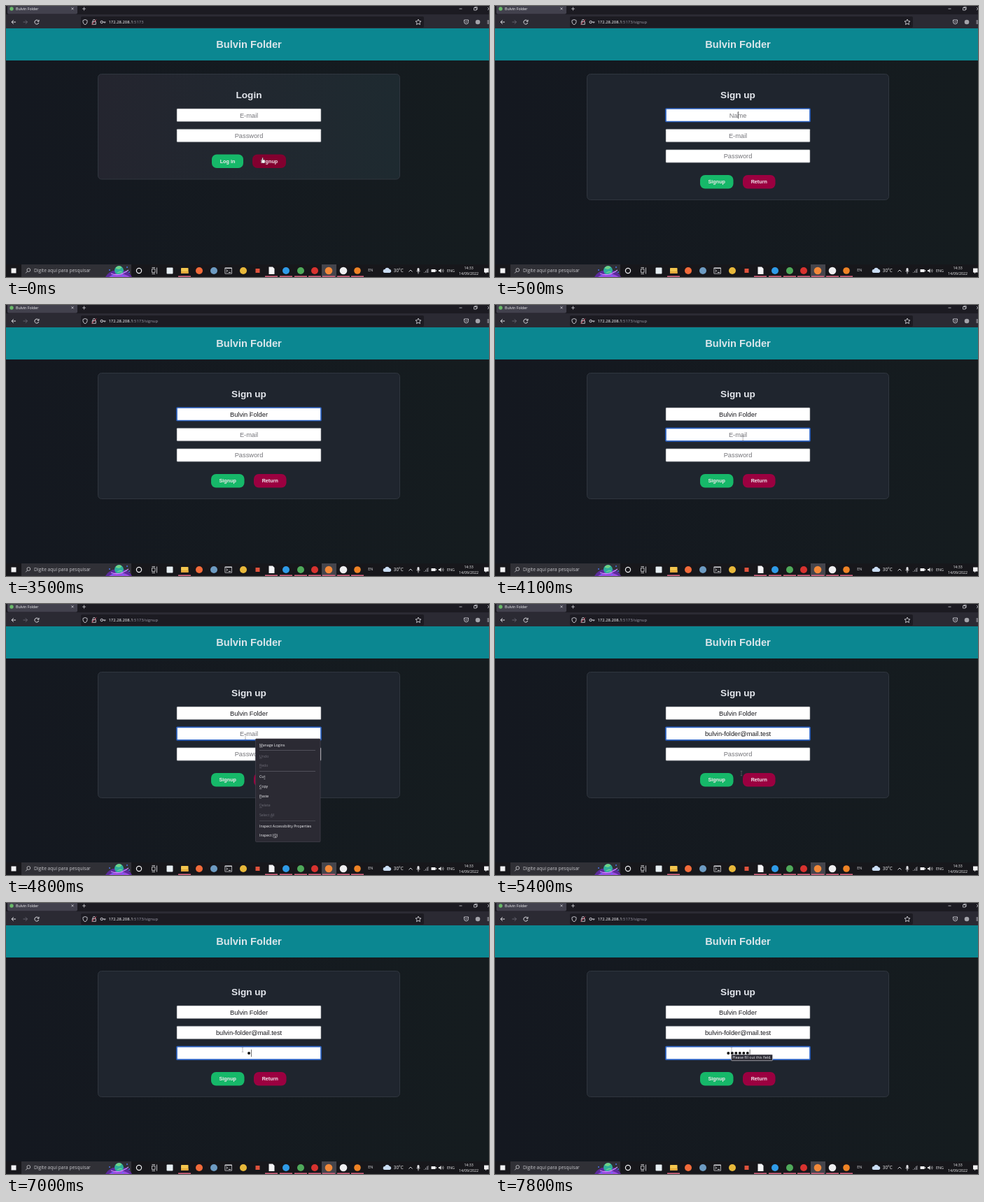
An HTML page with a canvas for the animation above (8 s loop, 690x388 px).

```html
<!DOCTYPE html>
<html lang="en">
<head>
<meta charset="utf-8">
<title>Bulvin Folder</title>
<style>
html, body { margin: 0; width: 100%; height: 100%; overflow: hidden; background: #151a1f; }
canvas { display: block; width: 690px; height: 388px; }
</style>
</head>
<body>
<canvas id="stage" width="690" height="388"></canvas>
<script>
const ctx = document.getElementById('stage').getContext('2d');
const LOOP = 8000, MID = 347;
const UI = '"Open Sans", "Noto Sans", sans-serif';
const PAGE = '"Liberation Sans", Arial, sans-serif';
const MONO = '"Liberation Mono", monospace';
const NAME = 'Bulvin Folder', EMAIL = 'bulvin-folder@mail.test';
const NAME_KEYS = [1000, 1100, 1500, 1600, 1800, 1900, 2200, 2400, 2500, 2700, 2800, 3000, 3200];
const PASS_KEYS = [6900, 7100, 7300, 7500, 7700, 7800];
const AT = { signup: 200, nameFocus: 500, emailFocus: 3800, menu: 4300, paste: 5100, passFocus: 5800, tip: 7300 };
// time, x, y
const MOUSE = [[0, 367, 221], [200, 367, 221], [500, 347, 156], [2400, 347, 156], [3500, 349, 156],
  [3700, 347, 186], [4200, 356, 192], [4500, 356, 192], [4700, 342, 190], [4800, 342, 190],
  [5000, 366, 275], [5200, 366, 275], [5600, 338, 210], [8000, 338, 210]];

function rect(x, y, w, h, fill, radius = 0, stroke, width = 1) {
  ctx.beginPath();
  ctx.roundRect(x, y, w, h, radius);
  if (fill) { ctx.fillStyle = fill; ctx.fill(); }
  if (stroke) { ctx.strokeStyle = stroke; ctx.lineWidth = width; ctx.stroke(); }
}
function circle(x, y, r, fill, stroke, width = 1) {
  rect(x - r, y - r, 2 * r, 2 * r, fill, r, stroke, width);
}
function path(d, color, width = 0.9, fill) {
  const p = new Path2D(d);
  if (fill) { ctx.fillStyle = fill; ctx.fill(p); }
  if (color) { ctx.strokeStyle = color; ctx.lineWidth = width; ctx.stroke(p); }
}
function text(s, x, y, size, color, { align = 'left', font = UI, style = '' } = {}) {
  ctx.font = `${style} ${size}px ${font}`;
  ctx.textAlign = align;
  ctx.fillStyle = color;
  ctx.fillText(s, x, y + size * 0.36);
  return ctx.measureText(s).width;
}
const centered = (s, x, y, size, color, style = '', font = PAGE) =>
  text(s, x, y, size, color, { align: 'center', font, style });
function gradient(x0, x1, from, to) {
  const g = ctx.createLinearGradient(x0, 0, x1, 0);
  g.addColorStop(0, from);
  g.addColorStop(1, to);
  return g;
}

function drawBrowser(t) {
  rect(0, 0, 690, 12, '#1c1b22');
  rect(2, -3, 100, 14.5, '#42414d', 2);
  circle(8, 4, 2.7, '#69b96a');
  text(NAME, 14, 4, 5.3, '#f2f2f5');
  path('M93.5 2.3l3 3m0-3l-3 3M109 4h5m-2.5-2.5v5M647.5 4h4', '#e4e4ea', 0.7);
  path('M668.5 2.5h3.5v3.5h-3.5zM669.7 2.5v-1h3.5v3.5h-1.2M688 2l4 4m0-4l-4 4', '#e4e4ea', 0.7);

  rect(0, 12, 690, 20, '#2b2a33');
  path('M14 23H8m2.7-2.7L8 23l2.7 2.7', '#f0f0f4');
  path('M24.500 23h6m-2.700-2.700l2.700 2.700l-2.700 2.700', '#6a6974');
  path('M46.500 21.500a3 3 0 1 0 .3 2.500M47 19.800v2.400h-2.400', '#f0f0f4');
  rect(107, 15, 490, 16, '#1c1b22', 2);
  path('M113 19.500l3 1v2.500q0 2.500-3 3.800q-3-1.300-3-3.800v-2.500z', '#e4e4ea', 0.8);
  path('M123.300 22.500h5v3.800h-5zM124.200 22.500v-1.500a1.600 1.600 0 0 1 3.200 0v1.500', '#e4e4ea', 0.8);
  path('M122.500 26.500l6.500-7', '#e2405c', 0.9);
  circle(136.700, 23, 1.700, null, '#e4e4ea', 0.9);
  path('M138.500 23h4m-1.500 0v1.600', '#e4e4ea', 0.9);
  const host = text('172.28.208.1', 146.5, 23, 5.9, '#fbfbfe');
  text(t < AT.signup ? ':5173' : ':5173/signup', 146.5 + host, 23, 5.9, '#9a99a6');
  path('M589 19l1.200 2.600l2.800.3l-2.100 1.900l.6 2.800l-2.500-1.400l-2.500 1.400l.6-2.800l-2.100-1.900l2.800-.3z', '#e4e4ea', 0.8);
  path('M654.500 20h6v2.500q0 3.300-3 3.300q-3 0-3-3.300zM656 22l1.500 1.500l1.500-1.500', '#e4e4ea', 0.8);
  circle(674, 23, 3.3, '#a3a3aa');
  path('M687.500 21h4m-4 2h4m-4 2h4', '#e4e4ea', 0.8);
}

function button(label, x, y, w, color) {
  rect(x, y, w, 19.5, color, 7);
  centered(label, x + w / 2, y + 9.8, 7.2, '#f3e9ee', 'bold');
}

function input(y, value, placeholder, focused, caret) {
  rect(244, y, 206, 18.5, '#fff', 1, focused ? '#2c63c4' : '#70757b', focused ? 1.7 : 0.6);
  const isDots = placeholder === 'Password' && value;
  let width = 0;
  if (isDots) {
    width = value.length * 5.5;
    [...value].forEach((_, i) => circle(MID - width / 2 + 2.8 + i * 5.5, y + 9.4, 2, '#111'));
  } else {
    width = centered(value || placeholder, MID, y + 9.2, 9.25, value ? '#15151a' : '#75757a');
  }
  if (focused && caret) rect(MID + (value ? width / 2 + 0.3 : 0), y + 4, 0.6, 10.5, '#111');
}

function drawPage(t) {
  rect(0, 32, 690, 338, gradient(0, 690, '#141820', '#151c1f'));
  rect(0, 32, 690, 46, '#0b8791');
  centered(NAME, MID, 54.5, 14.65, '#d9e5ea', 'bold');

  if (t < AT.signup) {
    rect(131.5, 97.5, 431, 150.5, gradient(131, 563, '#24252f', '#1e2a30'), 5, '#30363f');
    centered('Login', MID, 127, 13.6, '#e4e7ed', 'bold');
    input(147, '', 'E-mail');
    input(176.3, '', 'Password');
    button('Log in', 294, 212.5, 45, '#16b869');
    button('Signup', 352, 212.5, 48, '#82002f');
    return;
  }

  const nameCount = NAME_KEYS.filter(k => k <= t).length;
  const passCount = PASS_KEYS.filter(k => k <= t).length;
  const events = [AT.nameFocus, ...NAME_KEYS, AT.emailFocus, AT.paste, AT.passFocus, ...PASS_KEYS];
  const idle = t - Math.max(...events.filter(e => e <= t));
  const caret = idle < 200 || idle % 1000 >= 700;
  const email = t >= AT.paste ? EMAIL : '';

  rect(131.5, 97.5, 431, 180, '#1f252e', 5, '#30363f');
  centered('Sign up', MID, 127, 13.6, '#e4e7ed', 'bold');
  input(147, NAME.slice(0, nameCount), 'Name', t >= AT.nameFocus && t < AT.emailFocus, caret);
  input(176.3, email, 'E-mail', t >= AT.emailFocus && t < AT.passFocus, caret);
  input(205.7, '*'.repeat(passCount), 'Password', t >= AT.passFocus, caret);
  button('Signup', 293, 242, 47.5, '#16b869');
  button('Return', 354, 242, 46.5, '#9b0040');
}

function drawMenu(hoverPaste) {
  rect(356.5, 193, 92.5, 147.5, '#2b2a33', 1, '#45444f', 0.7);
  if (hoverPaste) rect(358, 268.5, 89, 13, '#494853');
  // label, y, index of the underlined letter, disabled
  const items = [['Manage Logins', 202, 0], ['Undo', 218, 0, 1], ['Redo', 231.5, 0, 1], ['Cut', 247.5, 2],
    ['Copy', 261.5, 0], ['Paste', 275, 0], ['Delete', 288.5, 0, 1], ['Select All', 302, 7, 1],
    ['Inspect Accessibility Properties', 318, -1], ['Inspect (Q)', 331.5, 9]];
  for (const [label, y, key, disabled] of items) {
    const color = disabled ? '#6d6c77' : '#f5f5f8';
    text(label, 362, y, 5.2, color);
    if (key < 0) continue;
    const x = 362 + ctx.measureText(label.slice(0, key)).width;
    rect(x, y + 2.7, ctx.measureText(label[key]).width, 0.5, color);
  }
  for (const y of [209.3, 239.3, 310]) rect(362, y, 80, 0.6, '#5d5c67');
}

function drawSuggestion() {
  rect(243.5, 224.5, 206, 42.5, '#2b2a33', 0, '#4a4953', 0.6);
  rect(243.5, 252, 206, 15, '#5b5a65');
  circle(249.8, 230.3, 2.9, null, '#a5a4ae', 0.6);
  path('M247 230.300h5.600M249.800 227.400q-2.600 2.900 0 5.800q2.600-2.900 0-5.800', '#a5a4ae', 0.5);
  text('Use a Securely Generated Password', 255, 230.2, 5.07, '#fbfbfe');
  text('Kdr7TMzbqEy4n6P', 255, 239, 4.9, '#b5b4be', { font: MONO });
  text('Vulpane will save this password for this website.', 255, 246.8, 4.2, '#a9a8b3', { style: 'italic' });
  centered('View Saved Logins', 346.5, 259.6, 5.1, '#fbfbfe', '', UI);
}

function drawTooltip() {
  rect(337.5, 217, 59, 8.7, '#2b2a33', 1, '#c9c9cf', 0.7);
  centered('Please fill out this field.', 367, 221.4, 5.2, '#fbfbfe', '', UI);
}

function drawTaskbar() {
  rect(0, 370, 690, 18, '#17171b');
  rect(7.5, 375.5, 7, 7, '#f2f2f4');
  rect(22, 370, 157, 18, '#303036');
  circle(32.3, 378, 2.4, null, '#d5d5d9', 0.8);
  path('M30.600 379.800l-2.400 2.600', '#d5d5d9', 0.8);
  text('Digite aqui para pesquisar', 40, 379, 6.63, '#c6c6cb');

  // saucer and planet in the search box
  path('M142 388q7-12 20-9q12-3 18 9z', null, 0, '#5b2a9c');
  path('M147 388q14-10 30 0z', null, 0, '#9a4be0');
  circle(161.500, 378.500, 6.500, '#2fae9b');
  path('M157 375q4-4 8-1q-3 4-8 1M159 382q4-3 7-1', '#7fe08f', 0.8, '#6fcf7f');
  path('M150 383q12 5 25-5', '#d08bff', 1.1);
  for (const [x, y] of [[148, 378], [173, 374], [176, 381], [152, 386], [167, 386]]) circle(x, y, 0.9, '#4f7dff');

  circle(190, 379, 3.6, null, '#f2f2f4', 1.2);
  path('M208.500 376.500h4.500v5h-4.500zM208.500 374.500h4.500M208.500 383.500h4.500M215.500 374.500v9', '#e4e4e8', 0.8);
  rect(451, 370, 21, 18, '#45454c');
  for (const x of [255, 379, 400, 421, 441, 461, 482, 502]) rect(x - 9, 386.4, 18, 1.6, '#d2627d');

  rect(229.5, 374.5, 9, 9, '#e6eef2', 1);
  rect(250, 375, 10.5, 8, '#f4c64e', 0.8);
  rect(250, 380, 10.5, 3, '#e3a93a');
  circle(276, 379, 5, '#f26b3a');
  circle(297, 379, 5, '#6d9bc2');
  rect(312.5, 374.5, 10.5, 9, '#d9d9dd', 0.8);
  rect(313.2, 376, 9.1, 6.8, '#222226');
  path('M314.500 377.500l2 1.700l-2 1.700M318 381.500h3', '#f2f2f4', 0.8);
  circle(339, 379, 5, '#e8b83a');
  rect(356.5, 376, 6, 6, '#e0523c');
  path('M375.500 373.500h5.500l2.500 2.500v8h-8z', null, 0, '#f4f4f6');
  circle(400, 379, 5, '#2f9be8');
  circle(421, 379, 5, '#4fa95a');
  circle(441, 379, 5, '#d8322f');
  circle(461, 379, 5.3, '#f2893a');
  circle(482, 379, 5.3, '#eeeef0');
  circle(502, 379, 4.8, '#ef8325');

  text('EN', 517.3, 378.3, 5.2, '#e4e4e8');
  path('M541 382a2.500 2.500 0 0 1 .3-5a3.600 3.600 0 0 1 6.500-.3a2.700 2.700 0 0 1 .5 5.300z', null, 0, '#c9dcf2');
  text('30°C', 553.8, 379, 6.3, '#f2f2f4');
  path('M575.500 380.500l2.500-2.500l2.500 2.500', '#e4e4e8');
  rect(587.5, 375, 3, 5, '#e4e4e8', 1.5);
  path('M586.500 379q2.500 4 5 0M589 381v2.500', '#e4e4e8', 0.7);
  path('M597.500 382v-1M599.500 382v-3M601.500 382v-5M603 382v-6', '#85858b', 1);
  rect(607.500, 377, 6, 4, '#f2f2f4', 0.5);
  rect(613.8, 378, 1, 2, '#f2f2f4');
  path('M618 378h1.500l2-2v6l-2-2h-1.500z', null, 0, '#f2f2f4');
  path('M622.800 377.500q1.200 1.500 0 3M624.200 376.500q2 2.500 0 5', '#e4e4e8', 0.6);
  text('ENG', 630, 379, 5.4, '#f2f2f4');
  centered('14:33', 661, 374.7, 5.2, '#f2f2f4', '', UI);
  centered('14/09/2022', 661, 383.5, 5.3, '#f2f2f4', '', UI);
  path('M683 375.500h6.500v6h-3l-1.500 1.800v-1.800h-2z', null, 0, '#f2f2f4');
}

function drawMouse(t) {
  const next = Math.max(1, MOUSE.findIndex(([time]) => time > t));
  const [t0, x0, y0] = MOUSE[next - 1], [t1, x1, y1] = MOUSE[next];
  const k = (t - t0) / (t1 - t0);
  const x = x0 + (x1 - x0) * k, y = y0 + (y1 - y0) * k;
  ctx.save();
  ctx.translate(x, y);
  if (t < AT.signup) {
    path('M-1.200-3.500q.9-.8 1.500 0v2.500l2.300.7q.8.3.6 1.300l-.6 3h-3.300l-2.200-3q.2-.8 1.700 0z', '#222', 0.4, '#fff');
  } else if (t >= 4900 && t < 5300) {
    path('M0 0v6l1.500-1.300l1 2.200l.9-.4l-1-2.100h2z', '#222', 0.4, '#fff');
  } else {
    path('M-1.300-3.200h2.600M0-3.200v6.400M-1.300 3.200h2.600', '#77777c', 0.5);
  }
  ctx.restore();
}

function frame(now) {
  const t = Math.floor(now % LOOP / 100) * 100;
  drawPage(t);
  drawBrowser(t);
  if (t >= AT.menu && t < AT.paste) drawMenu(t >= 5000);
  if (t >= AT.passFocus && t < PASS_KEYS[0]) drawSuggestion();
  drawMouse(t);
  if (t >= AT.tip) drawTooltip();
  drawTaskbar();
  requestAnimationFrame(frame);
}
requestAnimationFrame(frame);
</script>
</body>
</html>
```
